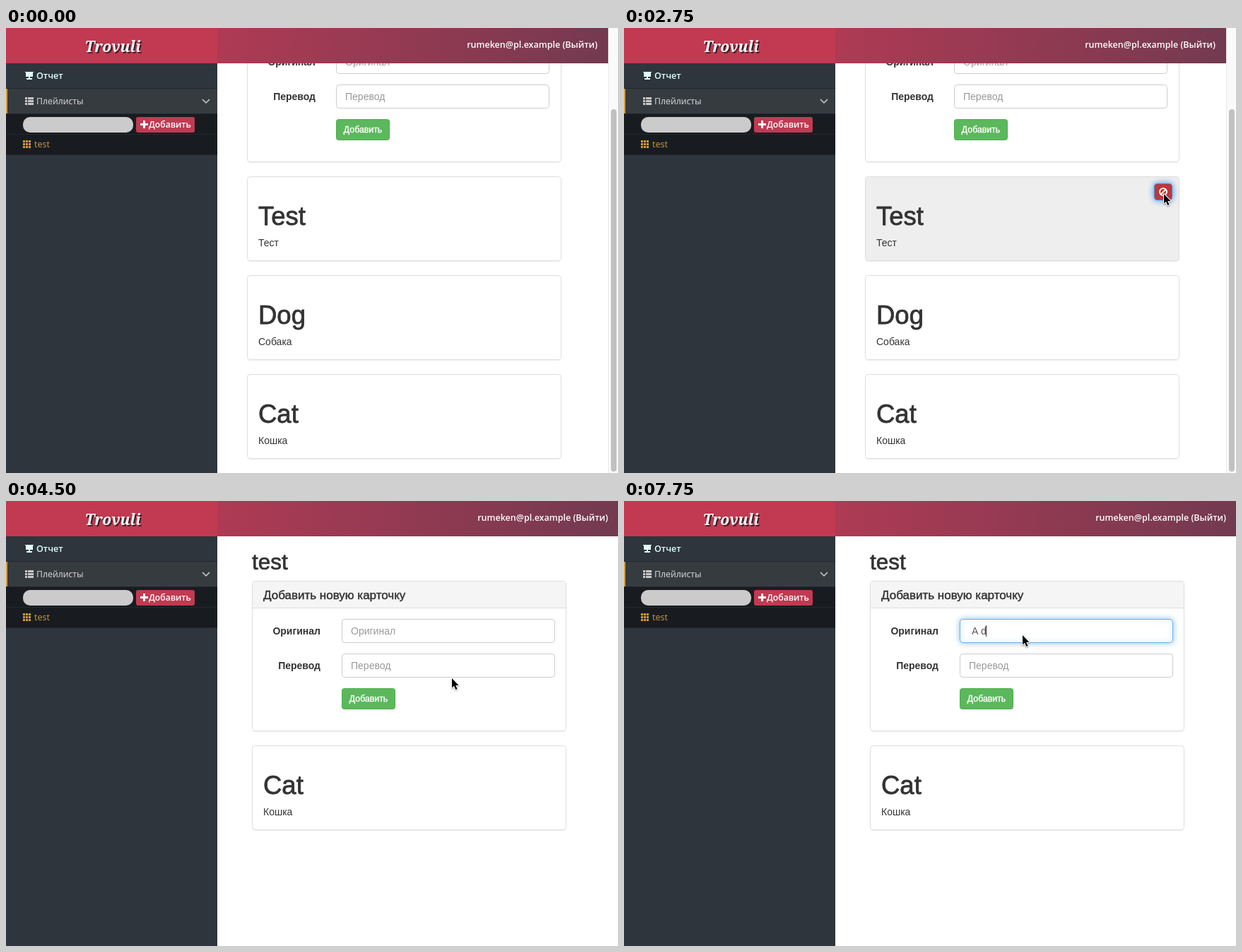
Recreate the animation shown at these times as an HTML page with a canvas. Size 866 by 630 pixels, loop 8000 ms.

```html
<!DOCTYPE html>
<html lang="ru">
<head>
<meta charset="utf-8">
<title>Карточки</title>
<style>
html, body { margin: 0; width: 100%; height: 100%; overflow: hidden; background: #fff; }
canvas { display: block; }
</style>
</head>
<body>
<canvas id="stage" width="866" height="630"></canvas>
<script>
const ctx = document.getElementById('stage').getContext('2d');
const LOOP = 8000, STEP = 250;
const SANS = '"Liberation Sans", Arial, sans-serif';
const UI = '"Open Sans", sans-serif';
const RED = '#c13a52', ORANGE = '#d19b3d', MINT = '#e1ffff';

const CARDS = [['Test', 'Тест'], ['Dog', 'Собака'], ['Cat', 'Кошка']];

// Pointer path: time, x, y
const POINTER = [
  [500, 436, 221], [1000, 650, 303], [1750, 558, 288], [2500, 763, 234],
  [3000, 764, 235], [3500, 766, 371], [4000, 766, 373], [4750, 564, 190], [LOOP, 564, 190]
];
const TYPING = [[5250, ' '], [5750, ' A'], [6750, ' A '], [7250, ' A d']];

const within = (t, from, to) => t >= from && t < to;

function rect(x, y, w, h, fill) {
  ctx.fillStyle = fill;
  ctx.fillRect(x, y, w, h);
}

// Rounded box with an optional one-pixel border and glow.
function box(x, y, w, h, r, fill, border, glow) {
  ctx.beginPath();
  if (border) ctx.roundRect(x + .5, y + .5, w - 1, h - 1, r);
  else ctx.roundRect(x, y, w, h, r);
  if (glow) {
    ctx.shadowColor = glow;
    ctx.shadowBlur = 8;
  }
  ctx.fillStyle = fill;
  ctx.fill();
  if (border) {
    ctx.strokeStyle = border;
    ctx.lineWidth = 1;
    ctx.stroke();
  }
  ctx.shadowBlur = 0;
  ctx.shadowColor = 'transparent';
}

// "weight" adds a thin outline for a medium cut.
function text(str, x, y, font, color, align = 'left', weight = 0) {
  ctx.font = font;
  ctx.textAlign = align;
  ctx.fillStyle = color;
  ctx.fillText(str, x, y);
  if (weight) {
    ctx.strokeStyle = color;
    ctx.lineWidth = weight;
    ctx.lineJoin = 'round';
    ctx.strokeText(str, x, y);
  }
}

function line(points, color, width) {
  ctx.beginPath();
  points.forEach(([x, y]) => ctx.lineTo(x, y));
  ctx.strokeStyle = color;
  ctx.lineWidth = width;
  ctx.stroke();
}

function panel(x, y, h, fill = '#fff') {
  rect(x + 2, y + h, 441, 1, '#f0f0f0');
  box(x, y, 445, h, 4, fill, '#ddd');
}

function drawInput(x, y, focused) {
  box(x, y, 302, 34, 4, '#fff', focused ? '#66afe9' : '#ccc', focused && 'rgba(102,175,233,.75)');
}

function drawForm(t, x, y, inputX) {
  const medium = `14px ${SANS}`, bold = `bold 14px ${SANS}`;
  const focused = t >= 5000, pressed = within(t, 1750, 2750);

  text('test', x, y - 16, `31.5px ${SANS}`, '#333', 'left', .7);
  panel(x, y, 213);
  box(x + 1, y + 1, 443, 38, [3, 3, 0, 0], '#f5f5f5');
  rect(x, y + 38, 445, 1, '#ddd');
  text('Добавить новую карточку', x + 16, y + 26, `17px ${SANS}`, '#333', 'left', .45);

  text('Оригинал', x + 97, y + 76, bold, '#333', 'right');
  text('Перевод', x + 97, y + 125, bold, '#333', 'right');
  drawInput(inputX, y + 54, focused);
  drawInput(inputX, y + 103, false);
  text('Перевод', inputX + 13, y + 125, medium, '#999');

  const typed = TYPING.reduce((value, [time, str]) => t >= time ? str : value, '');
  text(typed || 'Оригинал', inputX + 13, y + 76, medium, typed ? '#555' : '#999');
  if (focused && !within(t, 6250, 6750)) {
    const caret = inputX + 13 + Math.floor(ctx.measureText(typed).width);
    rect(caret, y + 63, 1, 16, '#333');
  }

  if (pressed) box(inputX - 1, y + 151, 78, 32, 4, '#449d44', '#3d8fe0', '#3d8fe0');
  else box(inputX, y + 152, 76, 30, 3, '#5cb85c', '#4cae4c');
  text('Добавить', inputX + 38, y + 171, `12.3px ${SANS}`, '#fff', 'center', .4);
}

function drawDelete(x, y, pressed) {
  if (pressed) box(x - 1, y - 1, 26, 24, 4, '#c9302c', '#3d8fe0', '#3d8fe0');
  else box(x, y, 24, 22, 3, '#d9534f', '#d43f3a');
  ctx.beginPath();
  ctx.arc(x + 12, y + 11, 5, 0, 7);
  ctx.strokeStyle = '#fff';
  ctx.lineWidth = 2;
  ctx.stroke();
  line([[x + 8.5, y + 14.5], [x + 15.5, y + 7.5]], '#fff', 2);
}

function drawCards(t, x, y) {
  const removed = (t >= 3000) + (t >= 4000);
  const hovered = within(t, 2000, 3000) || within(t, 3500, 4250);
  const pressed = within(t, 2750, 3000) || within(t, 3750, 4000);
  CARDS.slice(removed).forEach(([word, translation], i) => {
    const top = y + i * 140, active = hovered && i === 0;
    panel(x, top, 120, active ? '#eee' : '#fff');
    text(word, x + 16, top + 69, `36.5px ${SANS}`, '#333', 'left', .8);
    text(translation, x + 16, top + 99, `14px ${SANS}`, '#333');
    if (active) drawDelete(x + 410, top + 11, pressed);
  });
}

function drawHeader(right) {
  const fade = ctx.createLinearGradient(299, 0, 866, 50);
  fade.addColorStop(0, '#af3a54');
  fade.addColorStop(1, '#723a50');
  rect(299, 0, right - 299, 50, fade);
  rect(0, 0, 299, 50, RED);
  const logoFont = 'italic bold 21px "Noto Serif", serif';
  text('Trovuli', 153, 36, logoFont, '#3a2229', 'center');
  text('Trovuli', 151, 34, logoFont, '#fff', 'center');
  text('rumeken@pl.example (Выйти)', Math.min(right, 867) - 15, 28, `600 12.5px ${UI}`, '#fff', 'right');
}

function drawSidebar() {
  rect(0, 50, 299, 580, '#2e353d');
  rect(0, 85, 299, 1, '#23282e');
  rect(0, 86, 299, 35, '#363b40');
  rect(0, 86, 2, 35, ORANGE);
  rect(0, 121, 299, 1, '#23282e');
  rect(0, 122, 299, 58, '#181c20');
  rect(0, 150, 299, 1, '#23282e');
  rect(0, 179, 299, 1, '#23282e');

  rect(28, 62, 10, 7, MINT);
  rect(27, 62, 12, 1, MINT);
  rect(32, 69, 2, 2, MINT);
  rect(29, 71, 8, 2, MINT);
  text('Отчет', 43, 72, `600 12.5px ${UI}`, MINT);

  for (let row = 0; row < 3; row++) {
    rect(27, 98 + row * 4, 3, 3, '#c8c8c8');
    rect(31, 98 + row * 4, 8, 3, '#c8c8c8');
    for (let col = 0; col < 3; col++) rect(24 + col * 4, 159 + row * 4, 3, 3, ORANGE);
  }
  text('Плейлисты', 43, 108, `12.3px ${UI}`, '#c8c8c8', 'left', .2);
  line([[278, 101], [283, 106], [288, 101]], '#c8c8c8', 1.6);

  box(24, 126, 156, 22, 10, '#cbcbcb');
  box(184, 126, 83, 22, 3, RED);
  rect(190, 135, 11, 3, '#fff');
  rect(194, 131, 3, 11, '#fff');
  text('Добавить', 202, 141, `600 12.2px ${UI}`, '#fff');
  text('test', 40, 169, `12.5px ${UI}`, ORANGE);
}

function drawScrollbar() {
  rect(852, 0, 14, 630, '#fafafa');
  rect(852, 0, 1, 630, '#e8e8e8');
  box(856, 115, 8, 513, 4, '#c1c1c1');
}

function drawPointer(t) {
  const i = POINTER.findIndex(([time]) => time > t);
  if (i < 1) return;
  const [t0, x0, y0] = POINTER[i - 1], [t1, x1, y1] = POINTER[i];
  const k = (t - t0) / (t1 - t0);
  ctx.save();
  ctx.translate(Math.round(x0 + (x1 - x0) * k), Math.round(y0 + (y1 - y0) * k));
  const arrow = new Path2D('M0 0V13.5L3 10.8L5.3 16L7.6 15L5.3 10H9.6Z');
  ctx.lineJoin = 'round';
  ctx.lineWidth = 2;
  ctx.strokeStyle = '#fff';
  ctx.shadowColor = 'rgba(0,0,0,.4)';
  ctx.shadowBlur = 2;
  ctx.shadowOffsetY = 1;
  ctx.stroke(arrow);
  ctx.shadowColor = 'transparent';
  ctx.fillStyle = '#000';
  ctx.fill(arrow);
  ctx.restore();
}

function draw(now) {
  const t = Math.floor(now % LOOP / STEP) * STEP;
  const scrolled = t < 3000;
  const x = scrolled ? 341 : 348, scroll = scrolled ? 136 : 0;
  rect(0, 0, 866, 630, '#fff');
  drawForm(t, x, 113 - scroll, scrolled ? 467 : 475);
  drawCards(t, x, 346 - scroll);
  drawHeader(scrolled ? 852 : 867);
  drawSidebar();
  if (scrolled) drawScrollbar();
  drawPointer(t);
}

const start = performance.now();
function tick() {
  draw(performance.now() - start);
  requestAnimationFrame(tick);
}
tick();
</script>
</body>
</html>
```
